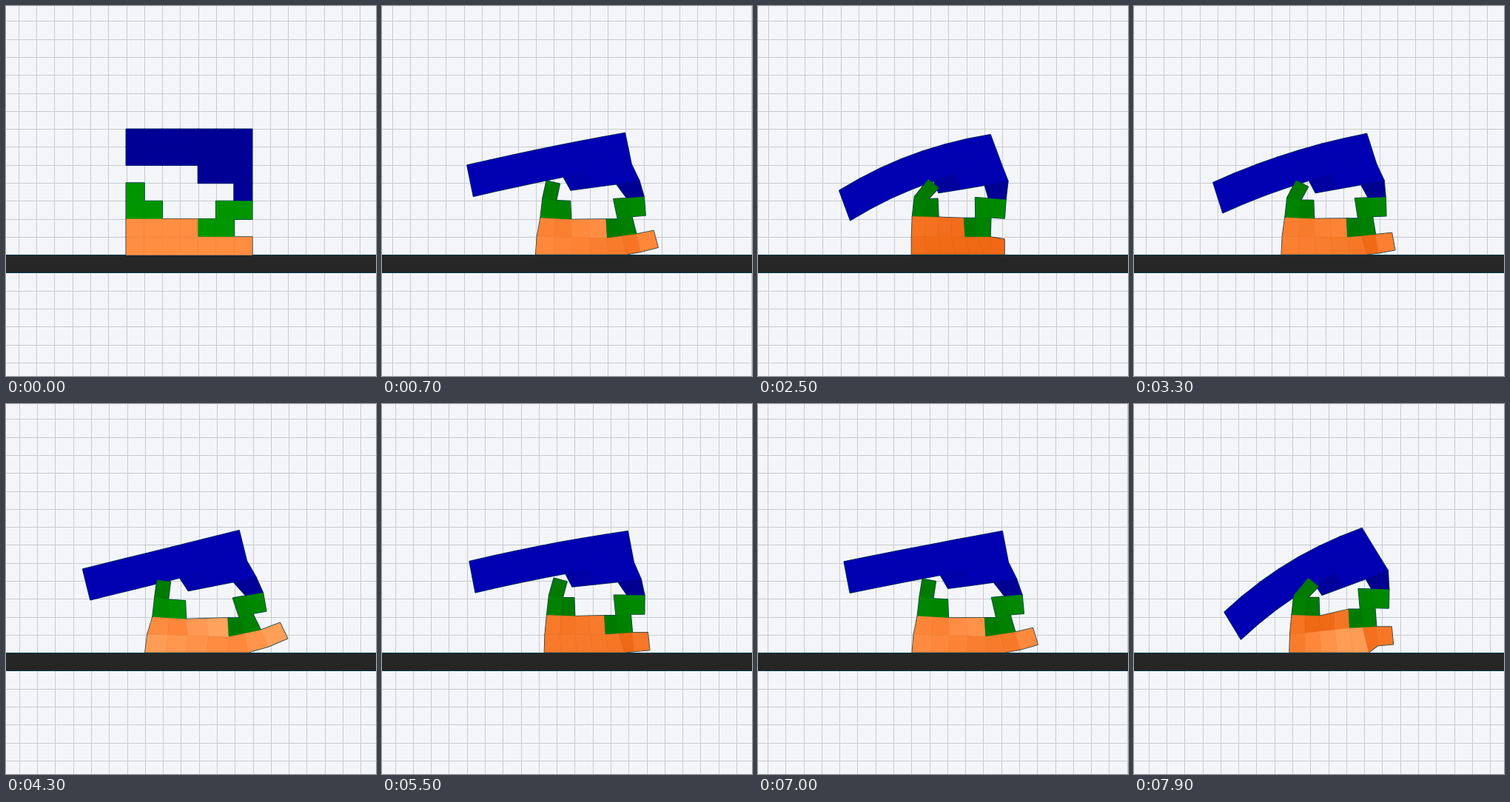
Animation of 500x500 px, one loop 8000 ms. Source, as an HTML page with a canvas:

```html
<!DOCTYPE html>
<html>
<head>
<meta charset="utf-8">
<title>Soft robot</title>
<style>
html, body { margin: 0; width: 100%; height: 100%; overflow: hidden; background: #f4f5f8; }
canvas { display: block; width: 500px; height: 500px; }
</style>
</head>
<body>
<canvas id="stage" width="500" height="500"></canvas>
<script>
const ctx = document.getElementById('stage').getContext('2d');
const CELL = 170 / 7, LOOP = 8000, STEP = 100, FLOOR = 336.5, RAD = Math.PI / 180;

// B: beam, G: legs, O: base
const voxels = [
  'BBBBBBB',
  'BBBBBBB',
  '....BBB',
  'G.....B',
  'GG...GG',
  'OOOOGG.',
  'OOOOOOO'
];

// x, y: top right end of the beam; pitch: its angle; sag: its bow;
// stretch: length of the base from 0 to 1; grid: offset of the backdrop.
const striding = { x: 330, y: 172, pitch: 10.9, sag: 0.5, stretch: 0.66, grid: 13.5, load: 1 };
const keys = [
  { ...striding, t: 0, grid: 17.35, load: 0 },
  { ...striding, t: 500 },
  { t: 1300, x: 319, y: 171, pitch: 14.9, sag: 7, stretch: 0.24, grid: 17.5, load: 1 },
  { t: 2500, x: 314, y: 174, pitch: 20.3, sag: 11, stretch: 0, grid: 14.9, load: 1 },
  { t: 4300, x: 315, y: 171, pitch: 13.9, sag: 0, stretch: 1, grid: 18.4, load: 1 },
  { t: 5500, x: 332, y: 172, pitch: 10.8, sag: 2.5, stretch: 0.25, grid: 18, load: 1 },
  { ...striding, t: 7000 },
  { t: 7900, x: 308, y: 168, pitch: 31.4, sag: 11.5, stretch: 0.22, grid: 20.2, load: 1 }
];

const mix = (a, b, k) => a + (b - a) * k;
const between = (p, q, k) => [mix(p[0], q[0], k), mix(p[1], q[1], k)];
const add = (p, x, y) => [p[0] + x, p[1] + y];
const clamp = (v, lo, hi) => Math.min(hi, Math.max(lo, v));
const turn = (x, y, deg) => {
  const c = Math.cos(deg * RAD), s = Math.sin(deg * RAD);
  return [x * c - y * s, x * s + y * c];
};

function stateAt(t) {
  const i = Math.max(1, keys.findIndex(key => key.t >= t));
  const a = keys[i - 1], b = keys[i];
  const f = (t - a.t) / (b.t - a.t), k = f * f * (3 - 2 * f);
  const state = {};
  for (const name in a) state[name] = mix(a[name], b[name], k);
  return state;
}

// Returns the place of each voxel corner; the legs and base hang from the beam.
function deform({ x: right, y: top, pitch, sag, stretch: k, load }) {
  const beam = (u, v) => add([right, top], ...turn(-u, v, -pitch));
  const neck = beam(2 * sag - 11, 89.5);
  const arm = (x, y) => add(neck, ...turn(x, y, 4 - 14 * k));

  const kneeR = add(neck, 18 * k - 21, 50.5);
  const kneeL = add(kneeR, -34 - 9 * k, 9 * k);
  const shelf = add(kneeL, -1.5, -25.5);
  const toe = add(kneeR, 19 + 7 * k, 3 - 13 * k);
  const heel = [kneeR[0] - 106 - 50 * k, FLOOR - 1];
  const foot = [kneeL[0] + 26, FLOOR - 1];
  const side = add(heel, 3 * k, -24);
  const hipL = add(heel, 1 + 9 * k, 3.5 * k - 51);
  const hipR = add(hipL, 35 + 10 * k, 1 + 2 * k);
  const elbow = add(hipL, 3, -27);
  const tip = add(hipL, 6 + 1.4 * sag, -50);
  const lean = Math.atan2(tip[1] - elbow[1], tip[0] - elbow[0]) / RAD;
  const under = (p, drop) => [p[0] + 10 * k, Math.min(FLOOR - 1, p[1] + drop)];

  const bent = (x, y) => {
    const f = 1 - x / 7;
    return beam(217.5 * f, 21.3 * y - 4 * sag * f * (1 - f));
  };
  const jaw = x => beam(31 * (7 - x) - 7 + 0.6 * sag, 67 - (7 - x) * (1.5 + 0.4 * sag));
  const legs = {
    3: x => x < 2 ? add(tip, ...turn(0, 18 * x, lean)) : jaw(x),
    4: x => x < 3 ? [elbow, add(hipL, 21, -23.5), add(hipR, -1, -25)][x]
      : arm([-41, -23, 0][x - 5], 0),
    5: x => x < 3 ? between(hipL, hipR, x / 2)
      : x < 5 ? between(hipR, shelf, x / 2 - 1)
      : x < 6 ? add(shelf, 16, 0) : arm(18.5 * (x - 7), 25),
    6: x => x < 4 ? between(side, kneeL, x / 4)
      : x < 7 ? between(kneeL, kneeR, x / 2 - 2) : toe,
    7: x => x < 6 ? between(heel, foot, x / 5)
      : x < 7 ? under(kneeR, 26 - 4 * k) : under(toe, 24 - 3 * k)
  };

  return (x, y) => between([162.5 + x * CELL, 166.5 + y * CELL],
    y < 3 ? bent(x, y) : legs[y](x), load);
}

// Voxel colour follows how far its area is stretched.
function tint(kind, quad) {
  const area = quad.reduce((sum, [x, y], i) => {
    const [nx, ny] = quad[(i + 1) % 4];
    return sum + (x * ny - nx * y) / 2;
  }, 0);
  const grow = area / CELL ** 2 - 1;
  if (kind === 'B') return `rgb(0,0,${clamp(150 + 280 * grow, 145, 178)})`;
  if (kind === 'G') return `rgb(0,${clamp(150 + 110 * grow, 122, 152)},0)`;
  const k = clamp(0.66 + 2.5 * grow, 0, 1.05);
  return `rgb(${Math.min(255, 240 + 25 * k)},${104 + 56 * k},${20 + 70 * k})`;
}

function outline(quad, width, color) {
  ctx.beginPath();
  quad.forEach(p => ctx.lineTo(...p));
  ctx.closePath();
  ctx.lineWidth = width;
  ctx.strokeStyle = color;
  ctx.stroke();
}

function draw(t) {
  const state = stateAt(t), corner = deform(state);
  ctx.fillStyle = '#f4f5f8';
  ctx.fillRect(0, 0, 500, 500);

  ctx.fillStyle = '#c9cacd';
  for (let i = 0; i < 21; i++) {
    ctx.fillRect(Math.floor(state.grid + i * CELL), 0, 1, 500);
    ctx.fillRect(0, Math.floor(20.95 + i * CELL), 500, 1);
  }

  ctx.fillStyle = '#262626';
  ctx.strokeStyle = '#00384a';
  ctx.lineWidth = 1;
  ctx.fillRect(0, FLOOR, 500, 24);
  ctx.strokeRect(-2, FLOOR, 504, 24);

  const cells = [];
  voxels.forEach((row, y) => [...row].forEach((kind, x) => {
    if (kind === '.') return;
    const quad = [corner(x, y), corner(x + 1, y), corner(x + 1, y + 1), corner(x, y + 1)];
    cells.push({ quad, color: tint(kind, quad) });
  }));

  ctx.lineJoin = 'round';
  cells.forEach(({ quad }) => outline(quad, 2, '#00384a'));
  cells.forEach(({ quad, color }) => {
    outline(quad, 0.6, color);
    ctx.fillStyle = color;
    ctx.fill();
  });
}

const start = performance.now();
function tick() {
  const t = (performance.now() - start) % LOOP;
  draw(Math.floor(t / STEP) * STEP);
  requestAnimationFrame(tick);
}
tick();
</script>
</body>
</html>
```
